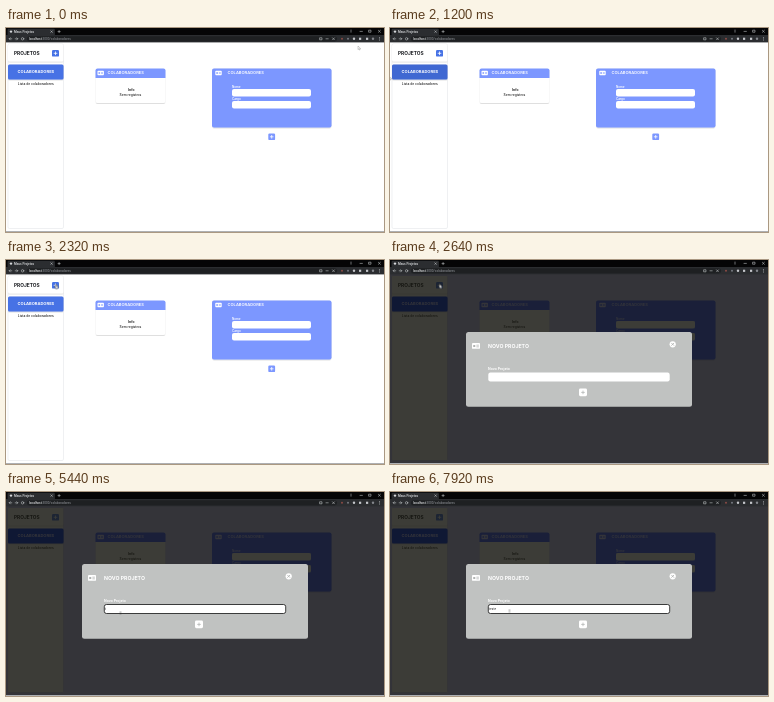
An HTML page for the animation above (8 s loop, 378 px wide and 204 px high).

```html
<!DOCTYPE html>
<html lang="pt">
<head>
<meta charset="utf-8">
<title>Projetos</title>
<style>
  html, body { margin: 0; width: 100%; height: 100%; overflow: hidden; background: #fff; }
  svg { display: block; width: 378px; height: 204px; }
  text { font-family: Inter, "Open Sans", sans-serif; }
  .bar { font: 500 3.1px Roboto, sans-serif; }
  .title { font-size: 4.8px; font-weight: 700; }
  .head { font-size: 4.05px; font-weight: 600; fill: #fff; }
  .label { font-size: 3px; font-weight: 600; fill: #fff; }
  .small { font-size: 3.3px; font-weight: 500; fill: #222; }
  .typed { font-size: 2.8px; font-weight: 500; fill: #222; }
  .bold { font-weight: 700; }
  .line { fill: none; stroke-width: .8; stroke-linecap: round; }

  /* One percent of the loop is 80 ms; every change is a hard step. */
  .step { animation: 8s step-end infinite; }
  .hover { animation-name: hover; }
  .modal { animation-name: modal; }
  .focus { animation-name: focus; }
  .pointer { animation-name: pointer; }
  .arrow { animation-name: arrow; }
  .hand { animation-name: hand; }
  .beam { animation-name: beam; }
  .k1 { animation-name: k1; }
  .k2 { animation-name: k2; }
  .k3 { animation-name: k3; }
  .k4 { animation-name: k4; }
  .k5 { animation-name: k5; }

  @keyframes hover { 0%, 21% { fill: #4672e5 } 15% { fill: #4068d2 } }
  @keyframes modal { 0% { opacity: 0 } 33%, 100% { opacity: 1 } }
  @keyframes focus { 0% { stroke-opacity: 0 } 41%, 100% { stroke-opacity: 1 } }
  @keyframes arrow { 0%, 33% { opacity: 1 } 23%, 39%, 100% { opacity: 0 } }
  @keyframes hand { 0%, 33%, 100% { opacity: 0 } 23% { opacity: 1 } }
  @keyframes beam { 0% { opacity: 0 } 39%, 100% { opacity: 1 } }
  @keyframes k1 { 0% { opacity: 0 } 68%, 100% { opacity: 1 } }
  @keyframes k2 { 0% { opacity: 0 } 73%, 100% { opacity: 1 } }
  @keyframes k3 { 0% { opacity: 0 } 77%, 100% { opacity: 1 } }
  @keyframes k4 { 0% { opacity: 0 } 79%, 100% { opacity: 1 } }
  @keyframes k5 { 0% { opacity: 0 } 83%, 100% { opacity: 1 } }
  @keyframes pointer {
    0% { transform: translate(352px, 18px) }
    4% { transform: translate(349px, 18px) }
    5% { transform: translate(345px, 18px) }
    10% { transform: translate(339px, 19px) }
    15% { transform: translate(-1px, 48px) }
    16% { transform: translate(6px, 47px) }
    17% { transform: translate(22px, 45px) }
    18% { transform: translate(38px, 43px) }
    21% { transform: translate(47px, 35px) }
    23% { transform: translate(49px, 25px) }
    27% { transform: translate(50px, 24.5px) }
    29% { transform: translate(49.5px, 24.5px) }
    38% { transform: translate(104px, 92px) }
    39% { transform: translate(114.5px, 119.5px) }
    95% { transform: translate(115.5px, 119px) }
    96% { transform: translate(117px, 118.5px) }
    99%, 100% { transform: translate(119.5px, 117.5px) }
  }
</style>
</head>
<body>
<svg viewBox="0 0 378 204">
  <defs>
    <filter id="shadow" x="-10%" y="-20%" width="120%" height="150%">
      <feDropShadow dx="0" dy=".5" stdDeviation=".6" flood-opacity=".25"/>
    </filter>
    <path id="plus" class="line" d="M-1.4 0h2.8M0-1.4v2.8"/>
    <g id="badge">
      <rect width="6.4" height="4.6" rx=".7" fill="#fff"/>
      <path d="M1 1.5h1.6v1.6H1zM3.5 1.4h2v.5h-2zM3.5 2.8h2v.5h-2z" fill="currentColor"/>
    </g>
  </defs>

  <rect width="378" height="204" fill="#fff"/>

  <!-- sidebar -->
  <rect x="2" y="16" width="55.5" height="184.5" rx="1.5" fill="#fff" stroke="#e4e6ea" stroke-width=".6"/>
  <rect x="2" y="16" width="55.5" height="17.5" rx="1.5" fill="#fff" filter="url(#shadow)"/>
  <text class="title" x="8" y="26.7" fill="#16181d">PROJETOS</text>
  <rect x="46" y="22" width="7" height="6.6" rx="1.2" fill="#4672e5"/>
  <use href="#plus" x="49.5" y="25.3" stroke="#fff"/>
  <g filter="url(#shadow)">
    <rect class="step hover" x="2" y="36.5" width="55.5" height="15" rx="1.5" fill="#4672e5"/>
  </g>
  <text class="head bold" x="29.9" y="45.3" text-anchor="middle">COLABORADORES</text>
  <text class="small" x="29.8" y="57" text-anchor="middle">Lista de colaboradores</text>

  <!-- member card -->
  <rect x="89.5" y="41" width="70" height="34" rx="2" fill="#fff" filter="url(#shadow)"/>
  <path d="M91.5 40.5h66a2 2 0 0 1 2 2V50h-70v-7.5a2 2 0 0 1 2-2z" fill="#7c97ff"/>
  <g color="#7c97ff"><use href="#badge" x="91.5" y="42.7"/></g>
  <text class="head" x="101.5" y="46.4">COLABORADORES</text>
  <text class="small bold" x="125.3" y="62.8" text-anchor="middle">Info</text>
  <text class="small" x="124.5" y="68.3" text-anchor="middle">Sem registros</text>

  <!-- member form -->
  <rect x="206" y="40.5" width="119.5" height="59" rx="2" fill="#7c97ff" filter="url(#shadow)"/>
  <g color="#7c97ff"><use href="#badge" x="209.3" y="42.7"/></g>
  <text class="head" x="221.5" y="46.4">COLABORADORES</text>
  <text class="label" x="226" y="60.2">Nome</text>
  <rect x="226" y="61" width="79" height="7.4" rx="2" fill="#fff"/>
  <text class="label" x="226" y="72.3">Cargo</text>
  <rect x="226" y="73" width="79" height="7.4" rx="2" fill="#fff"/>
  <rect x="262.3" y="105.5" width="6.8" height="6.6" rx="1.2" fill="#7c97ff"/>
  <use href="#plus" x="265.7" y="108.8" stroke="#fff"/>
  <rect y="203" width="378" height="1" fill="#aeb0b3"/>

  <!-- dialog -->
  <g class="step modal" opacity="0">
    <rect y="14" width="378" height="189" fill="#020208" fill-opacity=".8"/>
    <path d="M2 16h55.5v20.5H2zM2 51.5h55.5v149H2zM89.5 50h70v25h-70zM226 61h79v7.4h-79zM226 73h79v7.4h-79z" fill="#6c6a30" fill-opacity=".14"/>
    <rect x="76" y="72" width="226" height="74.7" rx="2.5" fill="#c0c2c1"/>
    <g color="#b0b2b1"><use href="#badge" transform="translate(82 83) scale(1.25)"/></g>
    <text class="title" x="98" y="88" fill="#fff" style="font-size:5.2px">NOVO PROJETO</text>
    <circle cx="282.7" cy="84.3" r="3.1" fill="#fff"/>
    <path class="line" d="M281.6 83.2l2.2 2.2m0-2.2l-2.2 2.2" stroke="#aeb0af"/>
    <text class="label bold" x="98" y="109.8" style="font-size:3.5px">Novo Projeto</text>
    <rect class="step focus" x="98.3" y="112.5" width="181.4" height="9" rx="2.2" fill="#fff" stroke="#111" stroke-width=".8" stroke-opacity="0"/>
    <g class="typed">
      <text class="step k1" x="98.8" y="118">t</text>
      <text class="step k2" x="100" y="118">e</text>
      <text class="step k3" x="101.8" y="118">s</text>
      <text class="step k4" x="103.4" y="118">t</text>
      <text class="step k5" x="104.6" y="118">e</text>
    </g>
    <rect x="189" y="128.6" width="8" height="7.6" rx="1.4" fill="#fff"/>
    <use href="#plus" x="193" y="132.4" stroke="#b4b6b5"/>
  </g>

  <!-- browser frame -->
  <rect width="378" height="7.5" fill="#050506"/>
  <path d="M1.5 7.5V2a1.2 1.2 0 0 1 1.2-1.2h45a1.2 1.2 0 0 1 1.2 1.2v5.5z" fill="#2b2d30"/>
  <rect y="7" width="378" height="7.4" fill="#2b2d30"/>
  <rect x="21" y="8.2" width="310" height="5.2" rx="2.6" fill="#1e2022"/>
  <circle cx="5" cy="3.6" r="1.2" fill="#d5d7da"/>
  <text class="bar" x="8" y="4.8" fill="#e2e4e6">Meus Projetos</text>
  <g class="line" stroke="#c9cbce" style="stroke-width:.55">
    <path d="M44.8 2.8l1.6 1.6m0-1.6l-1.6 1.6M52 3.6h2.2m-1.1-1.1v2.2"/>
    <path d="M5.8 10.8H3.2l1.1-1.1m-1.1 1.1l1.1 1.1M9.2 10.8h2.6l-1.1-1.1m1.1 1.1l-1.1 1.1"/>
    <circle cx="16.6" cy="10.8" r="1.2"/>
    <path d="M345 2v2.2M354 3.4h2.4M363 2.2h2v2h-2zM372.4 2.3l2 2m0-2l-2 2"/>
    <path d="M314 9.8h2v2h-2zM320 10.8h2.2M326.5 9.8l2 2m0-2l-2 2"/>
  </g>
  <text class="bar" x="23" y="11.9" fill="#e4e6e8">localhost<tspan fill="#85888d">:3000/colaboradores</tspan></text>
  <g fill="#c4c6ca">
    <circle cx="336" cy="10.8" r="1" fill="#8b4b45"/>
    <circle cx="342" cy="10.8" r="1" fill="#777a80"/>
    <circle cx="348" cy="10.8" r="1.2"/>
    <rect x="353" y="9.7" width="2.2" height="2.2"/>
    <rect x="360" y="9.7" width="2.2" height="2.2"/>
    <circle cx="367" cy="10.8" r="1.2" fill="#84878c"/>
    <path d="M373.3 9.2h.7v.7h-.7zM373.3 10.5h.7v.7h-.7zM373.3 11.8h.7v.7h-.7z"/>
  </g>

  <!-- pointer -->
  <g class="step pointer">
    <path class="step arrow" d="M0 0v3.6l.9-.8.6 1.3.6-.3-.6-1.2h1.2z" fill="#fff" stroke="#666" stroke-width=".3"/>
    <path class="step hand" opacity="0" d="M.2 0q.5-.4.8 0v1.3l1.7.5v1.4L2 4.2H.2L-.8 2.4l.3-.4.7.5z" fill="#fff" stroke="#222" stroke-width=".5"/>
    <path class="step beam" opacity="0" d="M0 0v.9M-.5 2.2h1" fill="none" stroke="#222" stroke-width=".8"/>
  </g>
</svg>
</body>
</html>
```
